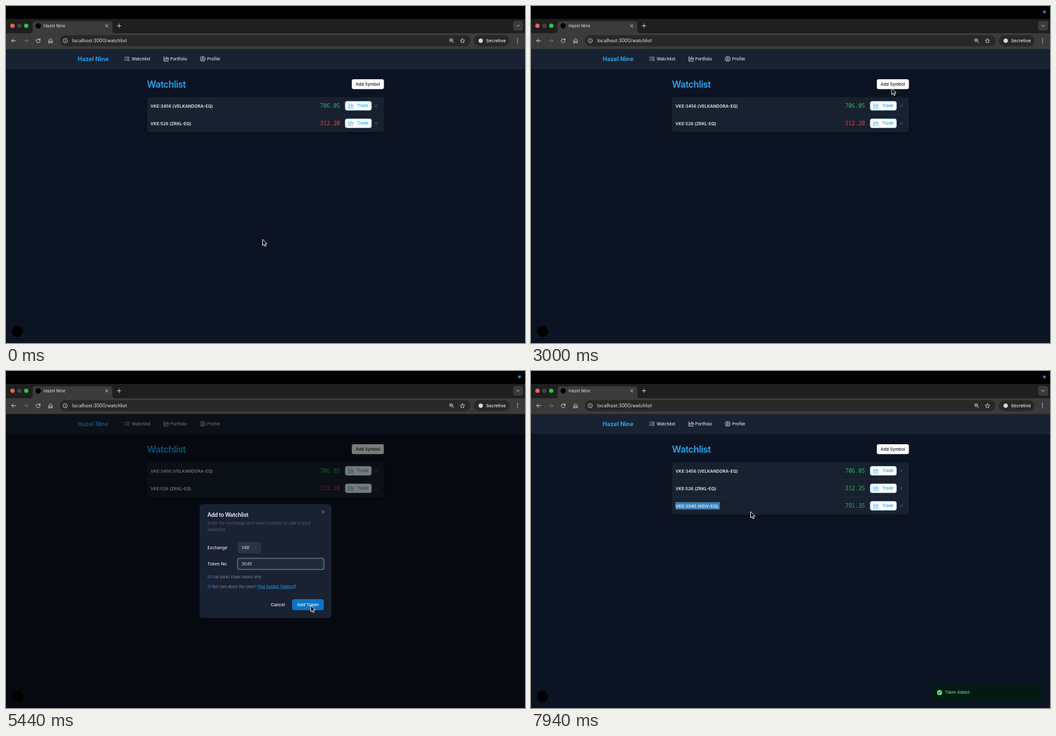
Animation, 800 px wide and 520 px high, one loop 8000 ms. Source, as an HTML page with a canvas:

```html
<!DOCTYPE html>
<html lang="en">
<head>
<meta charset="utf-8">
<title>Watchlist</title>
<style>
html, body { margin: 0; width: 100%; height: 100%; overflow: hidden; background: #0c1322; }
canvas { display: block; width: 800px; height: 520px; }
</style>
</head>
<body>
<canvas id="stage"></canvas>
<script>
const LOOP = 8000;
const canvas = document.getElementById('stage');
const ctx = canvas.getContext('2d');
const dpr = Math.max(1, window.devicePixelRatio || 1);
canvas.width = 800 * dpr;
canvas.height = 520 * dpr;

const SANS = 'Inter, Roboto, sans-serif';
const MONO = '"Noto Sans Mono", "DejaVu Sans Mono", monospace';
const BLUE = '#25a5ee', TEXT = '#dde3ea';
const GREEN = [48, 188, 86], RED = [232, 66, 66], WHITE = [205, 210, 216];

const OPEN_AT = 3320, CLOSE_AT = 5700, ROW_AT = 5720, TOAST_AT = 5780, DOT_AT = 300;
const DRAG_AT = 7330;
const KEYS = [4480, 4590, 4690, 4780];

// Cursor stops: time, x, y
const PATH = [
  [0, 395.5, 360], [1000, 395.5, 360], [1940, 303.5, 202], [2300, 304, 201],
  [2960, 556, 127], [3500, 556, 126], [4150, 449, 298], [4680, 449, 298],
  [5050, 468, 361], [5560, 470, 362], [5850, 484, 377], [6250, 484, 377],
  [7080, 222.5, 207.5], [DRAG_AT, 222.5, 207.5], [7900, 338.5, 217], [8000, 338.5, 217]
];

// Ticks: time, price, colour
const ROWS = [
  { name: 'VKE:3456 (VELKANDORA-EQ)', ticks: [[-999, '706.05', GREEN], [1000, '706.00', RED], [1830, '706.05', GREEN]] },
  { name: 'VKE:526 (ZRKL-EQ)', ticks: [[-999, '312.20', RED], [5800, '312.25', RED], [5870, '312.25', GREEN]] },
  { name: 'VKE:3045 (KEIV-EQ)', ticks: [[ROW_AT, '791.35', WHITE], [6600, '791.00', RED], [7500, '791.35', GREEN]] }
];

const clamp = v => Math.max(0, Math.min(1, v));
const mix = (a, b, u) => a + (b - a) * u;
const smooth = u => u * u * (3 - 2 * u);
const easeOut = u => 1 - (1 - u) ** 2;

function box(x, y, w, h, r, fill, stroke, width = 0.7) {
  ctx.beginPath();
  ctx.roundRect(x, y, w, h, r);
  if (fill) { ctx.fillStyle = fill; ctx.fill(); }
  if (stroke) { ctx.strokeStyle = stroke; ctx.lineWidth = width; ctx.stroke(); }
}

function disc(x, y, r, fill) {
  ctx.beginPath();
  ctx.arc(x, y, r, 0, 7);
  ctx.fillStyle = fill;
  ctx.fill();
}

function text(str, x, y, size, color, weight = 400, { family = SANS, align = 'left', track = 0 } = {}) {
  ctx.font = `${weight} ${size}px ${family}`;
  ctx.letterSpacing = track + 'px';
  ctx.textAlign = align;
  ctx.fillStyle = color;
  ctx.fillText(str, x, y);
  return ctx.measureText(str).width;
}

// Strokes an SVG path with its origin at x, y
function icon(d, x, y, color, width = 0.8) {
  ctx.save();
  ctx.translate(x, y);
  ctx.strokeStyle = color;
  ctx.lineWidth = width;
  ctx.lineCap = ctx.lineJoin = 'round';
  ctx.stroke(new Path2D(d));
  ctx.restore();
}

const cross = (x, y, r, color, width) => icon(`M${-r} ${-r}L${r} ${r}M${r} ${-r}L${-r} ${r}`, x, y, color, width);
const ring = r => `M${r} 0A${r} ${r} 0 1 1 ${-r} 0A${r} ${r} 0 1 1 ${r} 0`;
const CHART = 'M-3.5 -3.5V3.5H3.7M-1.4 -1V1.6M0.9 -3V1.6M3.2 -2V1.6M-2 -.5H-.8M.3 -1.8H1.5M2.6 0H3.8';

function drawBrowser(t) {
  ctx.fillStyle = '#000';
  ctx.fillRect(0, 0, 800, 20);
  if (t >= DOT_AT) {
    disc(791.5, 9, 2.6, '#123a5c');
    disc(791.5, 9, 1.8, '#2d8fe0');
  }
  ctx.fillStyle = '#1f1f1f';
  ctx.fillRect(0, 20, 800, 23);
  ctx.fillStyle = '#3b3b3b';
  ctx.fillRect(0, 42, 800, 24.5);
  ctx.fill(new Path2D('M37 42Q41 42 41 38V28Q41 23.5 45.5 23.5H159.5Q164 23.5 164 28V38Q164 42 168 42Z'));
  ['#ff5f57', '#424242', '#28c840'].forEach((c, i) => disc(10 + i * 10.6, 30.5, 3.3, c));

  disc(49.7, 30.6, 4.2, '#000');
  text('Hazel Nine', 58, 33, 6.5, '#e3e3e3');
  cross(155.3, 30.6, 1.9, '#dcdcdc');
  icon('M-2.8 0H2.8M0 -2.8V2.8', 174.3, 30.5, '#d5d5d5', 0.9);
  box(781.5, 23, 15.5, 15, 4, '#3b3b3b');
  icon('M-2 -1L0 1L2 -1', 789.3, 30.6, '#dcdcdc', 0.9);

  icon('M3 0H-3M-.2 -2.8L-3 0L-.2 2.8', 11.8, 53.6, '#d4d4d4', 0.9);
  icon('M-3 0H3M.2 -2.8L3 0L.2 2.8', 30.8, 53.6, '#777', 0.9);
  icon('M2.4 -1.8A3 3 0 1 0 3 .6M2.9 -3.2V-1.1H.8', 49.6, 53.6, '#d4d4d4', 0.9);
  icon('M-2.8 3.2V-.8L0 -3.2L2.8 -.8V3.2H1V.7H-1V3.2Z', 68.6, 53.6, '#d4d4d4', 0.9);

  box(83, 45, 633, 17, 8.5, '#282828');
  icon(ring(3.3) + 'M0 -.2V1.6M0 -1.7V-1.6', 91.3, 53.6, '#d4d4d4');
  text('localhost:3000/watchlist', 102, 56.2, 7.25, '#e8e8e8');
  icon('M1.7 -.6A2.3 2.3 0 1 1 -2.9 -.6A2.3 2.3 0 1 1 1.7 -.6M1 1L3.4 3.4M-1.7 -.6H.5', 686.8, 53.3, '#d4d4d4', 0.9);
  icon('M0 -3.4L1 -1.1L3.5 -.9L1.6 .8L2.2 3.2L0 1.9L-2.2 3.2L-1.6 .8L-3.5 -.9L-1 -1.1Z', 703.6, 53.6, '#d4d4d4');
  box(721, 45, 55, 17, 8.5, '#282828');
  disc(731.7, 53.6, 3.3, '#d9d9d9');
  text('Secretive', 740, 56.1, 6.75, '#ececec', 500);
  for (const y of [50.6, 53.6, 56.6]) disc(788.5, y, 0.8, '#d4d4d4');
}

function drawNav() {
  ctx.fillStyle = '#0c1322';
  ctx.fillRect(0, 66.5, 800, 453.5);
  ctx.fillStyle = '#192232';
  ctx.fillRect(0, 66.5, 800, 30.5);
  ctx.fillStyle = '#222c3c';
  ctx.fillRect(0, 96.5, 800, 0.5);
  text('Hazel Nine', 110.5, 85, 9.1, BLUE, 700);
  icon('M-3.8 -2L-2.9 -1.1L-1.2 -3.2M-3.8 1.6L-2.9 2.5L-1.2 .4M.3 -2.5H3.8M.3 0H3.8M.3 2.5H3.8', 186.3, 81.6, TEXT);
  icon(CHART, 246.8, 81.6, TEXT);
  icon(ring(3.8) + 'M1.3 -.8A1.3 1.3 0 1 1 -1.3 -.8A1.3 1.3 0 1 1 1.3 -.8M-2.4 2.8Q-2 1.2 0 1.2Q2 1.2 2.4 2.8', 303.2, 81.6, TEXT);
  [['Watchlist', 193.7], ['Portfolio', 253], ['Profile', 310]].forEach(([s, x]) => text(s, x, 84, 6.53, TEXT, 500));
}

function drawPrice(ticks, t, y) {
  let i = ticks.length - 1;
  while (i && t < ticks[i][0]) i--;
  const [start, value, color] = ticks[i];
  const from = ticks[Math.max(0, i - 1)][2];
  const u = clamp((t - start) / 300);
  const rgb = color.map((c, k) => Math.round(mix(from[k], c, u)));
  text(value, 515, y + 3.1, 8.6, `rgb(${rgb})`, 400, { family: MONO, align: 'right' });
}

function drawList(t) {
  text('Watchlist', 217.3, 125.8, 14, BLUE, 600, { track: -0.35 });
  box(533, 113, 49.5, 15.2, 3, '#fff');
  text('Add Symbol', 557.8, 123, 6.53, '#15181f', 500, { align: 'center' });

  const rows = ROWS.slice(0, t >= ROW_AT ? 3 : 2);
  ctx.save();
  ctx.shadowColor = 'rgba(0,0,0,.3)';
  ctx.shadowBlur = 4 * dpr;
  ctx.shadowOffsetY = 1.5 * dpr;
  box(217.3, 140.5, 365.4, rows.length * 27, 4, '#182130');
  ctx.restore();

  rows.forEach((row, i) => {
    const y = 154 + i * 27;
    if (i) {
      ctx.fillStyle = '#222c3b';
      ctx.fillRect(217.3, y - 13.7, 365.4, 0.6);
    }
    if (i === 2 && t > DRAG_AT) {
      const end = Math.min(291, cursorAt(t)[0]);
      ctx.fillStyle = '#3d80ba';
      ctx.fillRect(222.7, y - 5.6, Math.max(0, end - 222.7), 11.2);
    }
    text(row.name, 222.8, y + 2.5, 6.55, '#e6eaf0', 600);
    drawPrice(row.ticks, t, y);
    box(522.8, y - 7, 40.6, 14, 3, '#fff', '#8fd2f5', 0.5);
    icon(CHART, 531.5, y, BLUE, 0.7);
    text('Trade', 541, y + 2.4, 6.53, BLUE, 500);
    cross(570.5, y, 1.9, '#5d6878', 0.7);
  });
  disc(17.6, 502, 8.6, '#000');
}

function drawField(t) {
  box(357, 289, 133, 17.3, 3.2, '#202939', '#606a79', 1.5);
  const typed = t < CLOSE_AT ? '3045'.slice(0, KEYS.filter(k => t >= k).length) : '';
  let caret = 363.3;
  if (typed) caret += text(typed, 363, 300.1, 6.53, TEXT) + 0.3;
  else text('e.g., 3045 (for KEIV)', 363, 300.1, 6.53, '#4a5567');
  const lastKey = KEYS.filter(k => t >= k).pop() ?? OPEN_AT;
  if (t < 5550 && (t - lastKey) % 1000 < 500 || t > 4150 && t < KEYS[0]) {
    ctx.fillStyle = '#dfe4ea';
    ctx.fillRect(caret, 293.4, 0.6, 8.4);
  }
}

function drawDialog(t) {
  const shown = t < CLOSE_AT ? easeOut(clamp((t - OPEN_AT) / 200)) : 1 - easeOut(clamp((t - CLOSE_AT) / 250));
  if (shown <= 0) return;
  ctx.save();
  ctx.globalAlpha = shown;
  ctx.fillStyle = 'rgba(0,0,0,.52)';
  ctx.fillRect(0, 66.5, 800, 453.5);
  const scale = mix(0.95, 1, shown);
  ctx.translate(400, 293.3);
  ctx.scale(scale, scale);
  ctx.translate(-400, -293.3);

  box(299, 206, 202, 174.5, 4, '#192132', '#263144', 0.6);
  text('Add to Watchlist', 310.5, 224.8, 8.4, '#eef1f5', 600, { track: -0.2 });
  cross(489.3, 217.5, 1.9, '#aab2bd', 0.7);
  text('Enter the exchange and token number to add to your', 310.5, 237.2, 6.45, '#515c6d');
  text('watchlist.', 310.5, 246.6, 6.45, '#515c6d');

  text('Exchange', 310.5, 275.1, 6.53, TEXT, 500);
  box(357, 264, 36.3, 17.5, 3, '#293447');
  text('VKE', 363, 275.1, 6.53, TEXT);
  icon('M-1.7 -.8L0 .9L1.7 -.8', 384, 272.8, '#4a5668', 0.7);
  text('Token No.', 310.5, 300.1, 6.53, TEXT, 500);
  drawField(t);

  for (const y of [317.4, 332.6]) icon(ring(2.4) + 'M0 0V1.2M0 -1.2V-1.1', 313.3, y, '#1683c6', 0.6);
  text('Use equty share tokens only.', 318, 319.5, 5.6, '#7d8897');
  const ask = 318 + text('Not sure about the token?', 318, 334.7, 5.6, '#7d8897') + 1.7;
  const link = text('Find Symbol Tokens', ask, 334.7, 5.6, BLUE);
  ctx.fillStyle = BLUE;
  ctx.fillRect(ask, 335.6, link, 0.5);
  icon('M-.4 -1.6H-2V2H1.6V.4M.4 -2.1H2.1V-.4M2 -2L-.3 .3', ask + link + 3, 332.7, BLUE, 0.6);

  text('Cancel', 419, 362.6, 6.53, '#eef1f5', 500, { align: 'center' });
  box(441, 352, 48.8, 17, 3, '#0975c8');
  text('Add Token', 465.4, 362.7, 6.53, '#f2f7fc', 500, { align: 'center' });
  ctx.restore();
}

function drawToast(t) {
  const u = clamp((t - TOAST_AT) / 400);
  if (u <= 0) return;
  const p = easeOut(u);
  ctx.save();
  ctx.globalAlpha = p;
  ctx.translate(0, (1 - p) * 25);
  box(619, 484, 170, 24.4, 4, '#021a12', '#03291a', 0.6);
  disc(629.8, 496.2, 3.9, '#58e29d');
  icon('M-1.6 .1L-.5 1.2L1.6 -1.1', 629.8, 496.2, '#021a12', 0.9);
  text('Token Added', 638, 498.4, 6, '#55d797', 500);
  ctx.restore();
}

function cursorAt(t) {
  let i = 1;
  while (t > PATH[i][0]) i++;
  const [t0, x0, y0] = PATH[i - 1], [t1, x1, y1] = PATH[i];
  const u = smooth(clamp((t - t0) / (t1 - t0)));
  return [mix(x0, x1, u), mix(y0, y1, u)];
}

function drawCursor(t) {
  const [x, y] = cursorAt(t);
  const overField = t > 3800 && t < CLOSE_AT && x > 357 && x < 490 && y > 289 && y < 307;
  const overText = t > DRAG_AT && x > 224 && x < 291;
  if (overField || overText) {
    const beam = 'M-2 -5Q0 -5 0 -3.8Q0 -5 2 -5M0 -4V5M-2 6Q0 6 0 4.8Q0 6 2 6M-1.2 2H1.2';
    icon(beam, x, y, '#11161f', 2);
    icon(beam, x, y, '#e8e8e8', 0.9);
    return;
  }
  ctx.save();
  ctx.translate(x, y);
  const arrow = new Path2D('M0 0V9.6L2.2 7.6L3.7 11L5.3 10.3L3.9 7H6.9Z');
  ctx.lineJoin = 'round';
  ctx.fillStyle = '#000';
  ctx.fill(arrow);
  ctx.strokeStyle = '#fff';
  ctx.lineWidth = 0.9;
  ctx.stroke(arrow);
  ctx.restore();
}

function frame(now) {
  const t = now % LOOP;
  ctx.setTransform(dpr, 0, 0, dpr, 0, 0);
  drawNav();
  drawBrowser(t);
  drawList(t);
  drawDialog(t);
  drawToast(t);
  drawCursor(t);
  requestAnimationFrame(frame);
}
frame(performance.now());
</script>
</body>
</html>
```
